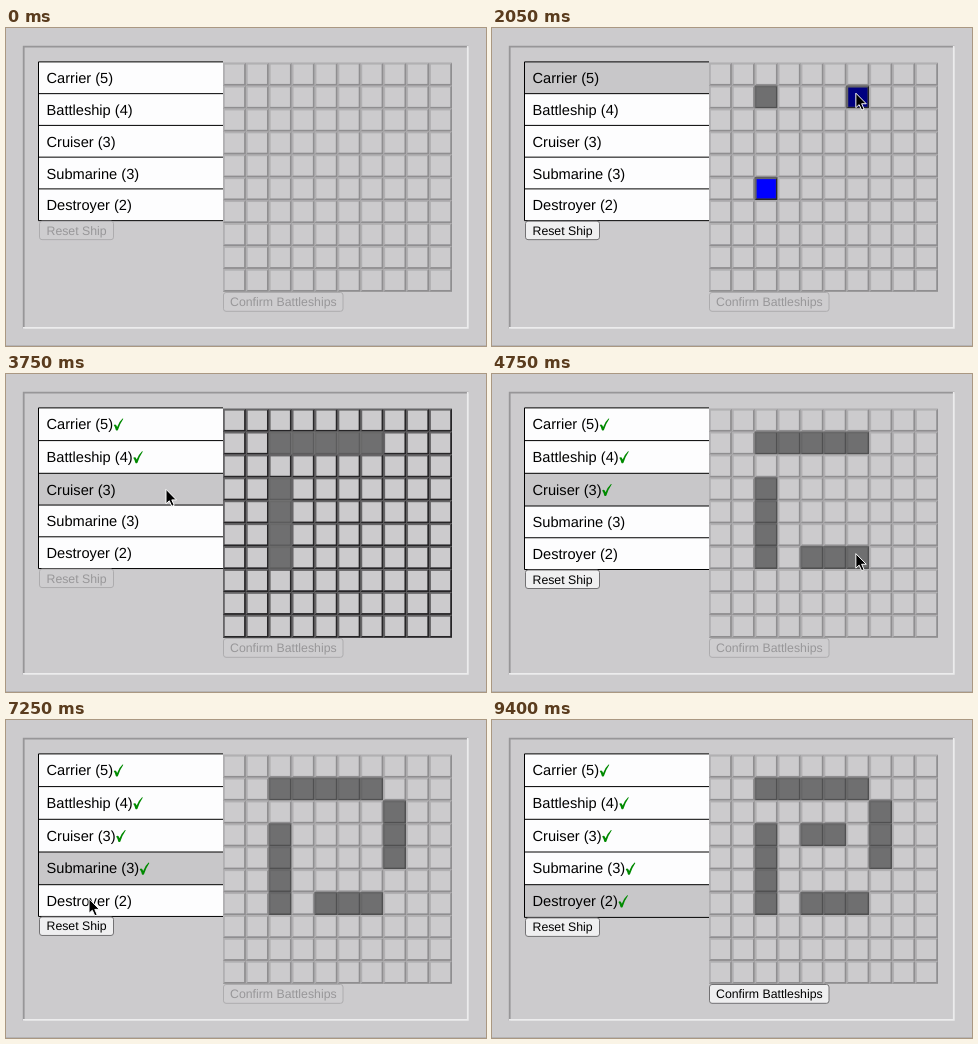
Animation, 480 px wide and 318 px high, one loop 9.45 s. Source, as an HTML page:

```html
<!DOCTYPE html>
<html lang="en">
<head>
<meta charset="utf-8">
<title>Ship placement</title>
<style>
  html, body { margin: 0; width: 100%; height: 100%; overflow: hidden; background: #cccbcd; }
  svg { display: block; width: 480px; height: 318px; }
  text { font: 14.63px "Liberation Sans", Arial, sans-serif; text-rendering: geometricPrecision; }
  .row rect { fill: #fdfdfe; }
  .row.picked rect { fill: #c8c7c9; }
  .row path { fill: #008a00; visibility: hidden; }
  .row.done path { visibility: visible; }
  .btn rect { fill: #cecdcf; stroke: #adacae; }
  .btn text { font-size: 12.3px; fill: #989799; }
  .btn.on rect { fill: #efeff0; stroke: #727173; }
  .btn.on text { fill: #000; }
  .cell { --face: #cccbcd; --lit: #b1b0b2; --shade: #8f8e90; }
  .open .cell, .cell.end { --lit: #666567; --shade: #262527; }
  .cell.end { --face: #00f; }
  .cell.ship { --face: #6f6f70; --lit: #676768; --shade: #505051; }
  .open .cell.ship { --lit: #696969; --shade: #5c5c5d; }
  .cell.end.hover { --face: #000080; }
  .open .cell.hover { --face: #000080; --lit: #20205e; --shade: #141460; }
  .face { fill: var(--face); }
  .lit { fill: var(--lit); }
  .shade { fill: var(--shade); }
</style>
</head>
<body>
<svg viewBox="0 0 480 318">
  <rect width="480" height="318" fill="#cccbcd"/>
  <rect y="317" width="480" height="1" fill="#b5b4b6"/>
  <g fill="none" stroke-width="1.8">
    <path d="M17.700 300.500V18.700H462.500" stroke="#979698"/>
    <path d="M461.800 18V299.900H17" stroke="#ececed"/>
  </g>
  <g id="grid"></g>
  <g id="list"></g>
  <path id="frame" fill="none" stroke="#000"/>
  <g id="reset" class="btn">
    <rect x="33.500" y=".5" width="74" height="18.500" rx="2.500"/>
    <text x="40.500" y="14">Reset Ship</text>
  </g>
  <g id="confirm" class="btn" transform="translate(0 264)">
    <rect x="217.500" y=".5" width="119.500" height="18.800" rx="2.500"/>
    <text x="224" y="14">Confirm Battleships</text>
  </g>
  <path id="cursor" d="M0 0V14.500L3.300 11.500L5.800 17L8.200 16L5.800 10.600H10.400Z"
        fill="#000" stroke="#fff" stroke-linejoin="round"/>
</svg>
<script>
  const LOOP = 9450, STEP = 50;
  const LEFT = 217, TOP = 34.8, SIZE = 22.9, EDGE = 1.83, N = 10;
  const LIST_LEFT = 32.5, LIST_TOP = 33.9, ROW = 31.75, GROW = 0.95, TEXT_LEFT = 40.5;
  const ENTER = 300, LEAVE = 9200, REST = 100, TRAVEL = 300;

  const dirs = { right: [1, 0], left: [-1, 0], down: [0, 1], up: [0, -1] };

  // clicks: list row, first cell, last cell; hand: x of the click on the row
  const ships = [
    { name: 'Carrier', len: 5, clicks: [700, 1500, 2150], x: 2, y: 1, dir: 'right', hand: 120 },
    { name: 'Battleship', len: 4, clicks: [2450, 2900, 3250], x: 2, y: 3, dir: 'down', hand: 160 },
    { name: 'Cruiser', len: 3, clicks: [3650, 4250, 4600], x: 4, y: 6, dir: 'right', hand: 160 },
    { name: 'Submarine', len: 3, clicks: [5200, 6600, 6900], x: 7, y: 4, dir: 'up', hand: 160 },
    { name: 'Destroyer', len: 2, clicks: [7350, 8050, 8700], x: 4, y: 3, dir: 'right', hand: 83 }
  ];

  const $ = id => document.getElementById(id);
  function add(parent, tag, attrs) {
    const el = document.createElementNS('http://www.w3.org/2000/svg', tag);
    for (const k in attrs) el.setAttribute(k, attrs[k]);
    return parent.appendChild(el);
  }
  const key = ([x, y]) => y * N + x;
  const inside = ([x, y]) => x >= 0 && y >= 0 && x < N && y < N;
  const smooth = u => u * u * (3 - 2 * u);

  function cellsOf(s, dir) {
    const [dx, dy] = dirs[dir];
    return Array.from({ length: s.len }, (_, i) => [s.x + dx * i, s.y + dy * i]);
  }

  const cellStop = (t, [x, y]) =>
    ({ t, x: LEFT + (x + 0.5) * SIZE - 2, y: TOP + (y + 0.5) * SIZE - 4 });

  // where the cursor waits: every click, plus two pauses over the grid
  const stops = ships.flatMap((s, i) => {
    const line = cellsOf(s, s.dir), [pick, start, end] = s.clicks;
    return [
      { t: pick, x: s.hand, y: LIST_TOP + (i + 0.5) * ROW + 2 },
      cellStop(start, line[0]),
      cellStop(end, line[s.len - 1])
    ];
  });
  stops.push(
    { t: ENTER, x: -12, y: 120 },
    { t: 2750, x: 271, y: 102 },
    { t: 5750, x: 384, y: 135 },
    { t: LEAVE, x: 382, y: 180 });
  stops.sort((a, b) => a.t - b.t);

  function cursorAt(t) {
    const i = stops.findIndex(s => s.t > t);
    if (i < 1) return i ? stops[stops.length - 1] : stops[0];
    const a = stops[i - 1], b = stops[i];
    const to = b.t - REST, from = Math.max(a.t + STEP, to - TRAVEL);
    const u = smooth(Math.min(1, Math.max(0, (t - from) / (to - from))));
    return { x: a.x + (b.x - a.x) * u, y: a.y + (b.y - a.y) * u };
  }

  // the highlight trails the cursor by one step
  function hoverAt(t) {
    const p = cursorAt(t - STEP);
    const c = [Math.floor((p.x - LEFT) / SIZE), Math.floor((p.y - TOP) / SIZE)];
    return inside(c) ? key(c) : -1;
  }

  const cells = Array.from({ length: N * N }, (_, i) => {
    const x = LEFT + i % N * SIZE, y = TOP + Math.floor(i / N) * SIZE;
    const g = add($('grid'), 'g', { transform: `translate(${x} ${y})` });
    const far = SIZE - EDGE, inner = far - EDGE;
    add(g, 'rect', { class: 'shade', width: SIZE, height: SIZE });
    add(g, 'path', { class: 'lit', d: `M0 ${SIZE}V0H${SIZE}L${far} ${EDGE}V${far}H${EDGE}Z` });
    add(g, 'rect', { class: 'face', x: EDGE, y: EDGE, width: inner, height: inner });
    return g;
  });

  const rows = ships.map(s => {
    const g = add($('list'), 'g', {});
    const box = add(g, 'rect', { x: LIST_LEFT, width: LEFT - LIST_LEFT });
    const label = add(g, 'text', { x: TEXT_LEFT, y: 21.4 });
    label.textContent = `${s.name} (${s.len})`;
    add(g, 'path', {
      transform: `translate(${TEXT_LEFT + label.getComputedTextLength()} 10.4)`,
      d: 'M.6 6.800Q1.800 5.600 3 6.600L4 8.600Q6.200 3 9.400 .2L10.200 .5Q6.800 5.400 4.800 11.800Q3.600 12.800 2.700 11.800Q2 8.800 .6 6.800Z'
    });
    return { g, box };
  });

  function possibleEnds(s, taken) {
    return Object.keys(dirs)
      .map(dir => cellsOf(s, dir).slice(1))
      .filter(line => line.every(c => inside(c) && !taken.has(key(c))))
      .map(line => key(line[line.length - 1]));
  }

  function drawGrid(t, current, open, aiming) {
    const taken = new Set();
    for (const s of ships)
      if (t >= s.clicks[2]) cellsOf(s, s.dir).forEach(c => taken.add(key(c)));
    if (aiming) taken.add(key([current.x, current.y]));
    const ends = aiming ? possibleEnds(current, taken) : [];
    const hover = hoverAt(t);

    $('grid').setAttribute('class', open ? 'open' : '');
    cells.forEach((el, i) => {
      const names = ['cell'];
      if (taken.has(i)) names.push('ship');
      else {
        if (ends.includes(i)) names.push('end');
        if (i === hover) names.push('hover');
      }
      el.setAttribute('class', names.join(' '));
    });
  }

  // a check mark makes its row a little taller; returns the bottom of the list
  function drawList(t, current) {
    let y = LIST_TOP, d = '';
    rows.forEach(({ g, box }, i) => {
      const s = ships[i], done = t >= s.clicks[2], h = ROW + (done ? GROW : 0);
      g.setAttribute('class', `row${s === current ? ' picked' : ''}${done ? ' done' : ''}`);
      g.setAttribute('transform', `translate(0 ${y})`);
      box.setAttribute('height', h);
      d += `M${LIST_LEFT} ${y}H${LEFT}`;
      y += h;
    });
    $('frame').setAttribute('d', `${d}M${LEFT} ${y}H${LIST_LEFT}V${LIST_TOP}`);
    return y;
  }

  function enable(id, on) {
    $(id).setAttribute('class', on ? 'btn on' : 'btn');
  }

  function draw(t) {
    const current = ships.filter(s => t >= s.clicks[0]).pop();
    const open = !!current && t < current.clicks[1];
    const aiming = !!current && !open && t < current.clicks[2];

    drawGrid(t, current, open, aiming);
    $('reset').setAttribute('transform', `translate(0 ${drawList(t, current)})`);
    enable('reset', current && !open);
    enable('confirm', ships.every(s => t >= s.clicks[2]));

    const p = cursorAt(t);
    $('cursor').setAttribute('transform', `translate(${p.x} ${p.y})`);
    $('cursor').setAttribute('visibility', t >= ENTER && t < LEAVE ? 'visible' : 'hidden');
  }

  function tick() {
    draw(Math.floor(performance.now() % LOOP / STEP) * STEP);
    requestAnimationFrame(tick);
  }
  tick();
</script>
</body>
</html>
```
